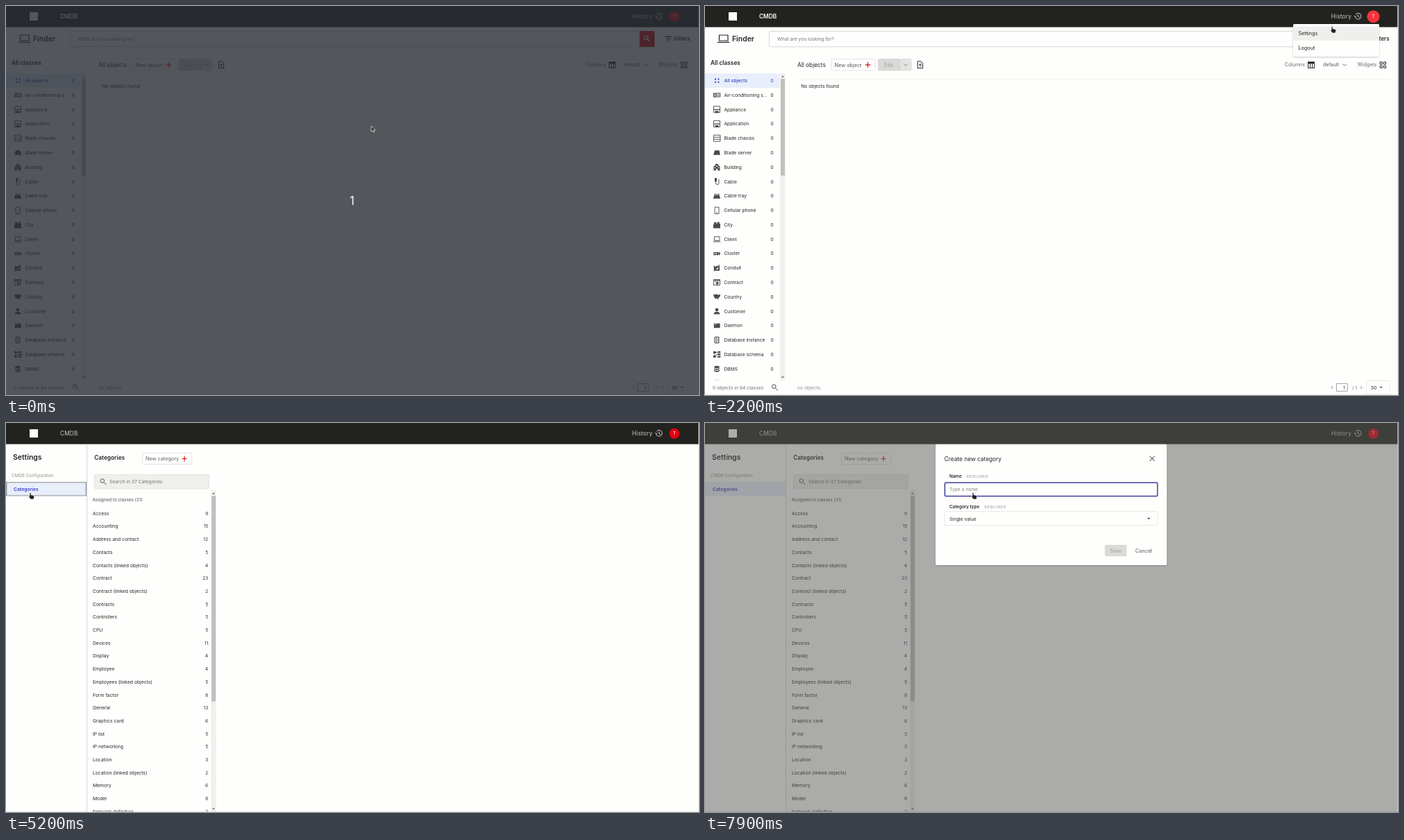
An HTML page for the animation above (8000 ms loop, 998 by 561 pixels).

```html
<!DOCTYPE html>
<html lang="en">
<head>
<meta charset="utf-8">
<title>Settings walkthrough</title>
<style>
html, body { margin: 0; width: 100%; height: 100%; overflow: hidden; background: #fefefd; }
svg { display: block; width: 100%; height: 100%; }
text { font-family: Inter, sans-serif; white-space: pre; }
</style>
</head>
<body>
<svg id="stage" viewBox="0 0 998 561"></svg>
<script>
const INK = '#252523', GREY = '#72726f', ICON = '#4b4b49', RED = '#e2000f', BLUE = '#3840c4', PALE = '#e8effb';
const LOOP = 8000, TICK = 100;

// Drawing helpers; text is placed by the middle of its capitals.
const text = (x, y, s, size = 6.76, fill = INK, weight = 400, extra = '') =>
  `<text x="${x}" y="${(y + size * .364).toFixed(2)}" font-size="${size}" fill="${fill}" font-weight="${weight}" ${extra}>${s}</text>`;
const rect = (x, y, w, h, fill, stroke = 'none', r = 0, extra = '') =>
  `<rect x="${x}" y="${y}" width="${w}" height="${h}" fill="${fill}" stroke="${stroke}" stroke-width=".7" rx="${r}" ${extra}/>`;
const line = (d, stroke = ICON, w = 1) => `<path d="${d}" fill="none" stroke="${stroke}" stroke-width="${w}"/>`;
const fill = (d, color = ICON) => `<path d="${d}" fill="${color}" fill-rule="evenodd"/>`;
const disc = (x, y, r, color, id = '') => `<circle cx="${x}" cy="${y}" r="${r}" fill="${color}" id="${id}"/>`;
const group = (id, ...parts) => `<g id="${id}">${parts.join('')}</g>`;
const END = 'text-anchor="end"', MID = 'text-anchor="middle"';
const SHADOW = 'filter="url(#shadow)"';

const lens = (x, y, color = ICON, w = 1) =>
  line(`M${x + 1} ${y + 1}l3.4 3.4M${x + 1.6} ${y - 1.2}a2.8 2.8 0 1 1-5.6 0a2.8 2.8 0 1 1 5.6 0`, color, w);
const plus = (x, y) => line(`M${x - 3.7} ${y}h7.4M${x} ${y - 3.7}v7.4`, '#d5101c', 1.2);
const chevron = (x, y, color = GREY) => line(`M${x - 3} ${y - 1.5}l3 3 3-3`, color);
const triangle = (x, y, up = 1, s = 2) => fill(`M${x - s} ${y + up * s / 2}h${2 * s}l${-s} ${-up * s}z`, '#555');
const scrollbar = (x, bottom, thumbEnd) =>
  rect(x, 97, 7.5, bottom - 97, '#f0f0ee') + rect(x + .8, 105, 6, thumbEnd - 105, '#c0c0be') +
  triangle(x + 3.7, 101.5) + triangle(x + 3.7, bottom === 561 ? 556.5 : 535.5, -1);

// Class list: name, filled path, stroked path in a 10 x 10 box.
const classes = [
  ['All objects', 'M2 2h2v2h-2zM6.4 2h2v2h-2zM2 6.2h2v2h-2zM6.4 6.2h2v2h-2z', ''],
  ['Air-conditioning s...', 'M0 2h5v6h-5zM1 3.5v1h3v-1zM1 5.7v1h3v-1z', 'M5 2.4h5v5.2h-5M9 5a1.4 1.4 0 1 1-2.8 0a1.4 1.4 0 1 1 2.8 0'],
  ['Appliance', 'M0 4.5h10v1.4h-10zM2.5 7h5v3h-5z', 'M.5.5h9v9h-9z'],
  ['Application', 'M0 4.5h10v1.4h-10zM2.5 7h5v3h-5z', 'M.5.5h9v9h-9z'],
  ['Blade chassis', '', 'M.4.5h9.6v9h-9.6zM.4 3.5h9.6M.4 6.5h9.6'],
  ['Blade server', 'M2 1.8h6.5l1.5 6.4h-10z', ''],
  ['Building', 'M.5 10v-6.5h2v-2l2.5-1.5 2.5 1.5v2h2v6.5h-3.3v-2.5h-2.4v2.5zM4 3v1.5h2v-1.5zM1.8 5.3v1.5h1.2v-1.5zM7 5.3v1.5h1.2v-1.5z', ''],
  ['Cable', 'M2 0h3v5h-3z', 'M3.5 4v3q0 2.5 2.5 2.5t2-3v-5'],
  ['Cable tray', 'M0 9l2-5h6l2 5z', 'M.5 8.5l2-7M9.5 8.5l-2-7M2.5 3h5'],
  ['Cellular phone', '', 'M2 .5h6v9.5h-6zM4 8.5h2'],
  ['City', 'M0 10v-5.5h1v-3h3.5v2h1.2v-2.5h3v2.5h1.3v6.5z', ''],
  ['Client', '', 'M1.5 1.5h7.5v5.8h-7.5zM0 8.8h10.5'],
  ['Cluster', 'M0 3h4v1.6h-4zM0 5.6h4v1.6h-4zM4.5 3h2.5v4.2h-2.5zM7.5 3h1.4l1.3 2-1.3 2.2h-1.4z', ''],
  ['Conduit', 'M.8 1.5l2.8 2 2-2 1.6 1.6 1.8-2v8h-8.2zM3 7.5l4.5-4-1 3.5z', 'M1 9.8l8-9.5'],
  ['Contract', 'M0 .8h10v2h-10zM4 5h3.5v3h-3.5z', 'M.5 2v7h9v-7M2 4.3h6'],
  ['Country', 'M0 1.5l3 .5 2-1 2 1.5 3-1-.3 3.5-2 1-.5 3.3-2.2-2-2 .7-2-2.5z', ''],
  ['Customer', 'M5 .6a2.3 2.3 0 0 1 0 4.7a2.3 2.3 0 0 1 0-4.7M.6 9.4q0-3.4 4.4-3.4t4.4 3.4z', ''],
  ['Daemon', 'M.8 2h8.8v6.3h-8.8zM1.8 3v.7h3v-.7z', ''],
  ['Database instance', 'M4 1.5h2v1.5h-2zM4 4.3h2v1.5h-2zM4 7h2v1.5h-2z', 'M2.5.5h5v9h-5zM.8 2h1.7M.8 5h1.7M.8 8h1.7M7.5 2h1.7M7.5 5h1.7M7.5 8h1.7'],
  ['Database schema', 'M0 .5h3.5v3h-3.5zM0 6.5h3.5v3h-3.5zM6.5.5h3.8v2.4h-3.8zM6.5 3.9h3.8v2.4h-3.8zM6.5 7.3h3.8v2.4h-3.8z', 'M3 2h4M3 8l2-3h2M2 3v4M5 8.5h2'],
  ['DBMS', 'M1 2q4-3 8 0v1q-4 2.4-8 0zM1 4q4 2.4 8 0v1.6q-4 2.4-8 0zM1 6.6q4 2.4 8 0v1.8q-4 2.8-8 0z', '']
];
const classRow = ([name, solid, outline], i) => {
  const y = 107.6 + i * 20.78, on = i === 0, color = on ? BLUE : ICON;
  return `<g transform="translate(12 ${y - 5})">${fill(solid, color)}${line(outline, color, .9)}</g>` +
    text(27.4, y, name, 6.76, on ? BLUE : INK, on ? 500 : 400) + text(98.8, y, 0, 6.76, on ? BLUE : INK, 400, END);
};

const categories = ('Access 9,Accounting 15,Address and contact 12,Contacts 5,Contacts (linked objects) 4,Contract 23,' +
  'Contract (linked objects) 2,Contracts 5,Controllers 5,CPU 5,Devices 11,Display 4,Employee 4,' +
  'Employees (linked objects) 5,Form factor 8,General 13,Graphics card 6,IP list 5,IP networking 5,Location 3,' +
  'Location (linked objects) 2,Memory 6,Model 8,Network definition 3').split(',');
const categoryRow = (entry, i) => {
  const cut = entry.lastIndexOf(' '), y = 130.3 + i * 18.7;
  return text(125, y, entry.slice(0, cut)) + text(291.2, y, entry.slice(cut + 1), 6.76, '#28324a', 400, END);
};

const header = rect(0, 0, 997.5, 30.5, '#22221e') +
  rect(34, 9, 12, 12, '#fff') +
  text(901.7, 15.3, 'History', 8.32, '#cbcbc8', 400, 'letter-spacing=".17"') +
  line('M937 12.2a4.4 4.4 0 1 1-.7 3.6M934.8 13.8l1.6 2 2-1.8M940.7 12.4v3l2.2 1.3', '#d5d5d2') +
  disc(962.5, 15.2, 7.5, RED, 'avatar') + text(962.5, 15.2, 'T', 6.2, '#fff', 500, MID);

const finder = group('finder',
  text(78, 15.3, 'CMDB', 8.32, '#fff', 600),
  line('M20.5 50v-8h12.5v8zM18 52.3h17.2', INK, 1.2),
  text(39, 47.4, 'Finder', 10.4, INK, 600),
  rect(92.4, 36.4, 841, 22.4, '#fefefd', '#c4c4c2', 2),
  text(104, 47.5, 'What are you looking for?', 6.76, GREY),
  fill('M912.5 36h19.5q2 0 2 2v19q0 2-2 2h-19.5z', RED), lens(923, 47, '#fff', 1.2),
  line('M949 44.4h10M950.8 47.4h6.4M952.7 50.4h2.6', INK, 1.1),
  text(962, 47.4, 'Filters', 7.8, INK, 600),
  text(8, 82, 'All classes', 8.32, INK, 600),
  rect(0, 97.3, 108.5, 20.6, PALE),
  classes.map(classRow).join(''),
  rect(13, 539.2, 8, .8, '#d4d4d2'),
  scrollbar(108.2, 540, 244.5),
  text(133, 84.8, 'All objects', 8.32),
  rect(181.6, 76.5, 63.2, 16.4, '#fefefd', '#d9d9d7', 1.5),
  text(186.6, 84.9, 'New object', 7.28, '#555552'), plus(234.5, 84.8),
  rect(249.4, 76.4, 31.6, 16.6, '#d9d9d7', '#cfcfcd', 1.5), rect(281, 76.4, 16, 16.6, '#e4e4e2', '#d2d2d0', 1.5),
  text(258, 84.9, 'Edit', 7.28, '#9a9a97'), chevron(289, 84.8, '#888'),
  line('M306.2 79.8h4.6l2.8 2.8v7.2h-7.4zM309.9 88v-4.5M308 85.2l1.9-1.9 1.9 1.9', INK),
  text(834.8, 84.9, 'Columns', 7, '#666663'),
  fill('M868 80.3h10v9.4h-10zM869 83.2v5.5h2v-5.5zM872 83.2v5.5h2v-5.5zM875 83.2v5.5h2v-5.5z', INK),
  text(890, 84.9, 'default', 7, '#555552'), chevron(921, 84.8),
  text(939.8, 84.9, 'Widgets', 7.1, '#666663'),
  line('M972 80.8h3.2v3.2h-3.2zM977.3 80.8h3.2v3.2h-3.2zM972 86.1h3.2v3.2h-3.2zM977.3 86.1h3.2v3.2h-3.2z', INK),
  line('M133 106.1h853', '#e9e9e7', .7),
  text(138.2, 115.6, 'No objects found'),
  text(11, 550.2, '0 objects in 64 classes', 6.76, GREY), lens(100.5, 550),
  text(133, 550.2, 'no objects', 6.76, '#8d8d8a'),
  line('M904 548l-2 2 2 2M944.2 548l2 2-2 2', '#888'),
  rect(909.4, 544.6, 15.8, 11, '#fefefd', '#777', .5), text(919, 550.2, 1),
  text(932, 550.2, '/ 1', 6.76, GREY),
  rect(952.4, 540.4, 34, 19.6, '#fefefd', '#e0e0de', 2), text(959, 550.2, 50), triangle(973.5, 550.2, -1, 2.3));

const menu = group('menu',
  rect(847, 26, 124, 47, '#fefefd', 'none', 1.5, SHADOW),
  rect(847, 29.5, 124, 20.3, '#efefed', 'none', 0, 'id="menuHover"'),
  text(854.4, 39.6, 'Settings', 7.28), text(854.4, 60.2, 'Logout', 7.28));

const settings = group('settings',
  text(78, 15.3, 'CMDB', 8.32, '#c9c9c6', 400, 'letter-spacing=".1"'),
  line('M116.6 30.5v530', '#c9c9c7', .8),
  text(10, 49.3, 'Settings', 10.4, INK, 600),
  text(8, 76.2, 'CMDB Configuration', 6.24, '#95948a'),
  rect(0, 85, 116, 20.3, PALE, 'none', 0, 'id="navOn"'),
  group('navFocus', rect(.6, 85.3, 114.8, 19.6, 'none', '#74746f'), rect(1.4, 86.1, 113.2, 18, 'none', '#b9bcc2')),
  group('navPlain', text(11, 95.4, 'Categories', 6.76, INK, 500)),
  group('navActive', text(11, 95.4, 'Categories', 6.76, BLUE, 600)));

const home = group('home',
  disc(557.2, 136.6, 20.8, RED), text(557.2, 136.6, 'T', 6.2, '#fff', 600, MID),
  text(557.2, 176.2, 'Hi TrialSampleAttribute4, nice to see you. Here you can adjust o-felt according to your needs.', 7.2, '#5a5a57', 600, MID),
  rect(167.6, 223.6, 251, 52, '#fefefd', '#e3e3e1', 3, SHADOW),
  text(178.4, 240.8, 'CMDB Configuration', 10.4, INK, 600),
  text(178.4, 261.2, 'Categories', 6.76, '#2029b8'));

const list = group('list',
  text(127.2, 50.2, 'Categories', 8.32, INK, 600),
  rect(196.6, 43.5, 71, 16, '#fefefd', '#d9d9d7', 1.5, 'id="newButton"'),
  text(201, 51.7, 'New category', 7.28, '#62625f'), plus(257, 51.5),
  rect(127.4, 74.4, 165, 20.4, '#efefed', '#dcdcda', 1.5, 'id="search"'),
  lens(140, 84.6, '#555'), text(149, 85, 'Search in 37 Categories', 6.76, GREY),
  text(124.4, 111.2, 'Assigned to classes (31)', 6.24, '#666663', 500),
  categories.map(categoryRow).join(''),
  scrollbar(295.2, 561, 401.5));

const dialog = group('dialog',
  rect(0, 0, 997.5, 561, 'rgba(90,90,86,.5)'),
  rect(332, 30.7, 333, 174.3, '#fefefd', 'none', 2, SHADOW),
  text(344.8, 51.7, 'Create new category', 8.32),
  line('M640.4 47.8l7.2 7.2M647.6 47.8l-7.2 7.2', INK),
  text(352, 76.8, 'Name', 6.24, INK, 600), text(376.8, 77, 'REQUIRED', 5.2, '#8d8d8a', 400, 'letter-spacing=".7"'),
  rect(345.4, 85.9, 306.2, 19.6, '#fefefd', '#3a3f9e', 1.5, 'style="stroke-width:1.5"'),
  text(352, 96, 'Type a name', 6.76, '#888885'),
  text(352, 120.5, 'Category type', 6.24, INK, 600), text(402.6, 120.7, 'REQUIRED', 5.2, '#8d8d8a', 400, 'letter-spacing=".7"'),
  rect(345, 127.6, 307, 20, '#fefefd', '#dededc', 1.5),
  text(352, 138.1, 'Single value'), triangle(639, 138, -1, 2.4),
  rect(575.8, 175.8, 31.4, 16.4, '#dadad8', 'none', 1.5), text(583, 184.3, 'Save', 7.28, '#9d9d9a'),
  text(619.8, 184.3, 'Cancel', 7.28, '#555552'));

const status = group('status', rect(0, 549, 129, 12, '#b1b1ae'),
  text(2, 555, 'https://care.o-felt.coffee/settings/', 7.8, '#fff', 400, 'style="font-family:\'Noto Sans\',sans-serif"'));
const countdown = group('countdown', rect(0, 0, 998, 561, 'rgba(40,44,52,.8)'),
  text(498.5, 281, 1, 16.64, '#fff', 400, MID));
const cursor = `<g id="cursor" fill="#222" stroke="#fff" stroke-width=".7">
  <path id="arrow" d="M0 0v8l1.9-1.7 1.3 3 1.4-.6-1.3-2.8h2.6z"/>
  <path id="hand" d="M-1 1q1-2 2 0v2.6l3.6.8q1.4.6 1 2.6l-.9 3h-4.3l-2.9-4q.3-1.3 1.5-.3z"/></g>`;

const stage = document.getElementById('stage');
stage.innerHTML = `<defs><filter id="shadow" x="-10%" y="-20%" width="120%" height="150%">
  <feDropShadow dx="0" dy="1" stdDeviation="1.2" flood-opacity=".22"/></filter></defs>` +
  rect(0, 0, 998, 561, '#fefefd') + header + finder + menu + settings + home + list +
  line('M997.6 0v560.5H0', '#e2e2e0', .7) + dialog + status + countdown + cursor;

// Pointer moves: start, end, x, y, hand.
const moves = [
  [500, 1400, 963, 13, 1], [2100, 2200, 903, 29, 1], [2200, 2600, 878, 39.5, 1], [2700, 2800, 878, 39.5, 0],
  [3200, 3900, 46, 97, 1], [3900, 4200, 24, 101, 1], [5100, 5200, 35, 100, 1], [5200, 5400, 122, 107, 0],
  [5500, 5700, 165, 80, 1], [5800, 5900, 197, 57, 0], [6000, 6200, 237.5, 50.5, 0], [7100, 7300, 352, 94, 1],
  [7400, 7500, 378, 100, 1], [7600, 7700, 383, 100, 1], [7800, 7900, 386, 100, 1]
];
const ease = p => p * p * (3 - 2 * p);
const pointer = t => {
  let x = 526, y = 173, hand = 0;
  for (const [start, end, nx, ny, kind] of moves) {
    if (t <= start) break;
    const p = ease(Math.min(1, (t - start) / (end - start)));
    x += (nx - x) * p;
    y += (ny - y) * p;
    hand = p < 1 ? 0 : kind;
  }
  return { x, y, hand };
};

const el = id => document.getElementById(id);
const set = (id, name, value) => el(id).setAttribute(name, value);
const show = (id, on) => set(id, 'display', on ? 'inline' : 'none');

function draw(now) {
  const t = Math.floor(now % LOOP / TICK) * TICK;
  const during = (from, to = LOOP) => t >= from && t < to;
  show('countdown', during(0, 100));
  show('finder', during(0, 2800));
  show('menu', during(1500, 2800));
  set('menu', 'opacity', Math.min(1, (t - 1400) / 400));
  show('menuHover', during(2200));
  show('status', during(2400, 3400));
  show('settings', during(2800));
  show('home', during(2800, 4600));
  show('list', during(4600));
  show('navOn', during(4400));
  show('navFocus', during(4400, 6400));
  show('navPlain', during(0, 4600));
  show('navActive', during(4600));
  show('dialog', during(6800));
  set('search', 'stroke', during(5600, 5900) ? '#8a8a87' : '#dcdcda');
  set('newButton', 'fill', during(6500, 6800) ? '#c8c8c6' : during(6100, 6500) ? '#e6e6e4' : '#fefefd');
  const hot = during(1400, 2800);
  set('avatar', 'r', hot ? 9 : 7.5);
  set('avatar', 'fill', hot ? '#f4343d' : RED);
  const { x, y, hand } = pointer(t);
  set('cursor', 'transform', `translate(${x} ${y})`);
  show('hand', hand);
  show('arrow', !hand);
}

const begin = performance.now();
const frame = () => {
  draw(performance.now() - begin);
  requestAnimationFrame(frame);
};
frame();
</script>
</body>
</html>
```
